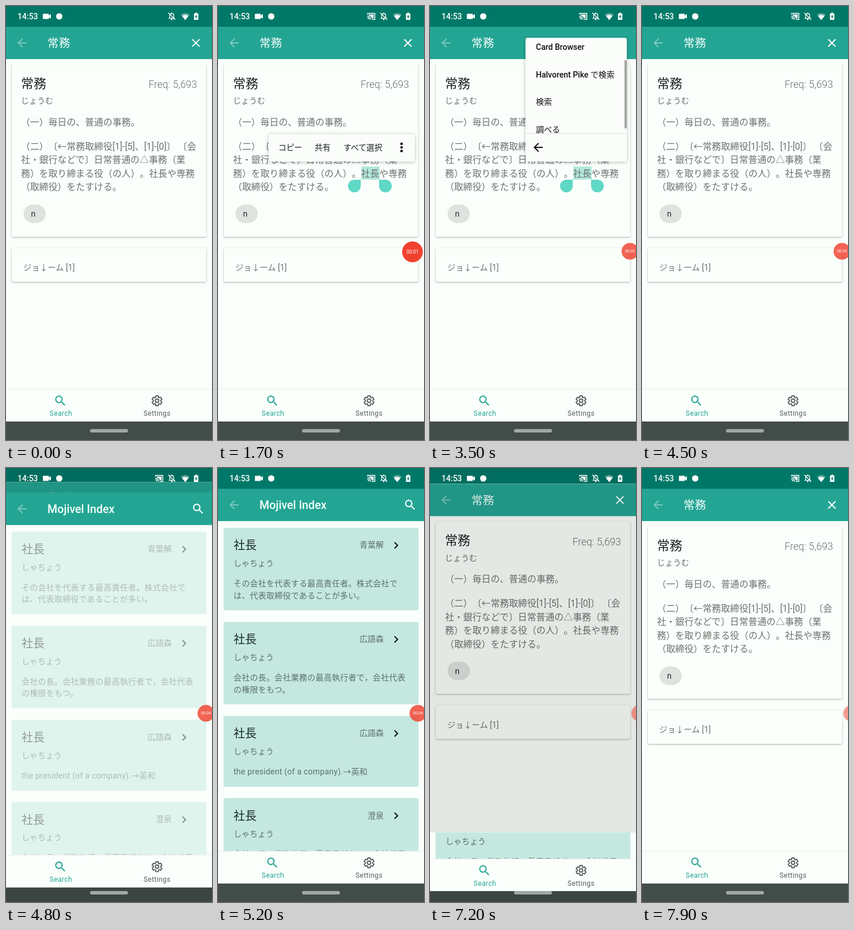
An HTML page for the animation above (8 s loop, 358 px wide and 752 px high).

```html
<!DOCTYPE html>
<html lang="ja">
<head>
<meta charset="utf-8">
<style>
html, body { margin: 0; height: 100%; overflow: hidden; background: #fafffb; }
svg { display: block; overflow: hidden; }
text { font-family: Roboto, "Noto Sans CJK JP", "Noto Sans CJK", sans-serif; text-spacing-trim: space-all; }
.card { fill: #fbfffb; filter: drop-shadow(0 1px 1.5px rgba(0, 0, 0, .32)); }
.popup { fill: #fafdfa; filter: drop-shadow(0 1px 3px rgba(0, 0, 0, .25)); }
</style>
</head>
<body>
<svg id="stage" width="358" height="752" viewBox="0 0 358 752"></svg>
<script>
const TEAL = '#24a594', PAGE = '#fafffb', GREY = '#6c736f', INK = '#1c211f';
const ICONS = {
  back: 'M20 11H7.83l5.59-5.59L12 4l-8 8 8 8 1.41-1.41L7.83 13H20z',
  close: 'M19 6.41L17.59 5 12 10.59 6.41 5 5 6.41 10.59 12 5 17.59 6.41 19 12 13.41 17.59 19 19 17.59 13.41 12z',
  search: 'M15.5 14h-.79l-.28-.27A6.5 6.5 0 1 0 13.73 14.43l.27.28v.79l5 4.99L20.49 19zM9.5 14a4.5 4.5 0 1 1 0-9 4.5 4.5 0 0 1 0 9z',
  chevron: 'M10 6L8.59 7.41 13.17 12l-4.58 4.59L10 18l6-6z'
};

// Text is placed by the vertical centre of its line.
const text = (x, cy, size, str, fill = GREY, attrs = '') =>
  `<text x="${x}" y="${cy + size * .365}" font-size="${size}" fill="${fill}" ${attrs}>${str}</text>`;
const rect = (x, y, w, h, fill, attrs = '') =>
  `<rect x="${x}" y="${y}" width="${w}" height="${h}" fill="${fill}" ${attrs}/>`;
const icon = (name, cx, cy, fill, attrs = '') =>
  `<path d="${ICONS[name]}" transform="translate(${cx - 12} ${cy - 12})" fill="${fill}" ${attrs}/>`;

function gear(cx, cy) {
  const points = [];
  for (let i = 0; i < 6; i++)
    for (const [r, offset] of [[6.6, -21], [8.8, -14], [8.8, 14], [6.6, 21]]) {
      const a = (i * 60 + offset) * Math.PI / 180;
      points.push([cx + r * Math.sin(a), cy - r * Math.cos(a)]);
    }
  return `<g fill="none" stroke="#59605c" stroke-width="1.9" stroke-linejoin="round">
    <polygon points="${points.join(' ')}"/><circle cx="${cx}" cy="${cy}" r="3"/></g>`;
}

const header = (title, action, actionX, weight) => rect(0, 36, 358, 56, TEAL) +
  icon('back', 28, 64, '#fff', 'opacity=".4"') +
  text(72, 64, 19.7, title, '#f4fffb', `font-weight="${weight}"`) +
  icon(action, actionX, 64, '#fff');

const bottomBar = () => rect(0, 664, 358, 56, PAGE) + rect(0, 663.5, 358, 1, '#e9eeea') +
  icon('search', 94.5, 684, TEAL) + gear(262.5, 684) +
  text(95.5, 706, 12, 'Search', TEAL, 'text-anchor="middle" letter-spacing=".4"') +
  text(262.5, 706, 12, 'Settings', '#59605c', 'text-anchor="middle" letter-spacing=".4"');

function entryScreen() {
  const lines = ['（二）〔←常務取締役[1]-[5]、[1]-[0]〕 〔会', '社・銀行などで〕日常普通の△事務（業',
    '務）を取り締まる役（の人）。社長や専務', '（取締役）をたすける。'];
  return rect(0, 0, 358, 36, '#007868') + rect(0, 36, 358, 690, PAGE) +
    header('常務', 'close', 330, 400) +
    '<rect class="card" x="10" y="101" width="338" height="299" rx="3"/>' +
    '<rect class="card" x="10" y="419.5" width="338" height="58.5" rx="3"/>' +
    text(26, 133.5, 22, '常務', INK) + text(26, 164, 14, 'じょうむ') +
    text(332, 136, 17.5, 'Freq: 5,693', GREY, 'text-anchor="end" font-weight="300"') +
    text(26, 201, 15.9, '（一）毎日の、普通の事務。') +
    rect(249, 278, 32, 23, '#b4e8dc', 'id="highlight"') +
    lines.map((line, i) => text(26, 243 + i * 23.5, 15.9, line)).join('') +
    rect(30.5, 344, 38.5, 32, '#dfe3df', 'rx="16"') + text(43.5, 360, 14, 'n', INK) +
    text(30, 453, 14.2, 'ジョ↓ーム [1]') +
    bottomBar() + rect(0, 720, 358, 80, '#424c48');
}

function listScreen() {
  const items = [
    [104, 142, '青葉解', 'その会社を代表する最高責任者。株式会社で', 'は、代表取締役であることが多い。'],
    [267, 142, '広語森', '会社の長。会社業務の最高執行者で，会社代表', 'の権限をもつ。'],
    [430, 122, '広語森', 'the president (of a company).→英和', ''],
    [572.5, 142, '澄泉', '会社の長。業務執行の最高責任者で，会社代表', '']
  ];
  const card = ([y, h, book, ...lines]) =>
    rect(10, y, 338, h, '#c4e8e0', 'rx="2.5" stroke="#b9ddd5" stroke-width=".6"') +
    text(27, y + 30, 20, '社長', '#1b2a26') + text(27, y + 61, 14, 'しゃちょう', '#5c706a') +
    text(288, y + 29, 14, book, '#5c706a', 'text-anchor="end"') +
    icon('chevron', 309.5, y + 30, '#0b1210') +
    lines.map((s, i) => text(27, y + 96 + i * 20.5, 14, s, '#5c706a', 'letter-spacing=".25"')).join('');
  return rect(0, 36, 358, 684, PAGE) +
    `<g id="cards">${items.map(card).join('')}</g>` +
    header('Mojivel Index', 'search', 334, 500) + bottomBar();
}

function popupMenu() {
  const bold = 'font-weight="500"';
  const rows = ['翻訳', 'Card Browser', 'Halvorent Pike で検索', '検索', '調べる'];
  return `<g id="handles" fill="#5fd8c6">
      <path d="M248 301v11a11 11 0 1 1-11-11z"/><path d="M280 301v11a11 11 0 1 0 11-11z"/></g>
    <g id="popup"><rect id="panel" class="popup" rx="4"/>
      <g id="actions">${text(105, 245, 13.8, 'コピー', INK, bold)}${text(168, 245, 13.8, '共有', INK, bold)}
        ${text(218, 245, 13.8, 'すべて選択', INK, bold)}
        ${[238.7, 245, 251.3].map(y => `<circle cx="319" cy="${y}" r="2.2"/>`).join('')}</g>
      <g id="overflow">
        <svg x="166" y="55" width="176" height="166" viewBox="166 55 176 166"><g id="rows">
          ${rows.map((s, i) => text(184, 78.5 + i * 47.5, 14, s, '#111', bold)).join('')}</g>
          <rect id="thumb" x="338" width="4" height="118" fill="#a3a7a4"/></svg>
        ${rect(166, 220.5, 176, 1, '#dde0dd')}${icon('back', 188, 245, '#111')}</g></g>`;
}

const statusIcons = () => `<g fill="#fff">
  ${text(20, 18, 14, '14:53', '#fff', 'font-weight="500"')}
  <path d="M65 13.5h8.500q1 0 1 1v2l3.500-2.500v8l-3.500-2.500v2q0 1-1 1h-8.500q-1 0-1-1v-7q0-1 1-1z"/>
  <circle cx="92.500" cy="18" r="5.500"/>
  <g id="cast"><path fill="none" stroke="#fff" stroke-width="1.400"
    d="M260 15v-2.300h12.500v10.500h-5M259.500 17.500a6 6 0 0 1 6 6M259.500 20.300a3.200 3.200 0 0 1 3.200 3.200"/>
    <path d="M262 14.700h8.500v6.500h-3q-1.500-4-5.500-5z"/></g>
  <path fill="none" stroke="#fff" stroke-width="1.300"
    d="M284.500 21v-4.500q0-3.500 3.500-3.500t3.500 3.500v4.500M282.500 21.300h11M282 11.800l12 12M288 11.500v1.500"/>
  <circle cx="288" cy="23.300" r="1.300"/>
  <path opacity=".4" d="M311.500 24.500l-7.500-9.500q7.500-5.500 15 0z"/><path d="M311.500 24.500l-5.500-7q5.500-3.800 11 0z"/>
  <path d="M329 11.500h3v1.500h2.300v11h-7.600v-11h2.300z"/><path fill="#007868" d="M331 14.500l-2.700 4.700h1.700v3l2.700-4.700H331z"/></g>`;

document.getElementById('stage').innerHTML =
  `<g id="entry">${entryScreen()}${rect(0, 0, 358, 800, '#000', 'id="dim"')}</g>
  <svg id="list" width="358">${listScreen()}</svg>
  ${popupMenu()}${statusIcons()}${rect(146, 733, 66, 6, '#a0a8a4', 'rx="3"')}
  <g id="bubble"><circle r="18" fill="#f0412f"/>
    <text id="timer" y="3" font-size="8.5" fill="#fff" text-anchor="middle"></text></g>`;

const el = {};
document.querySelectorAll('[id]').forEach(e => el[e.id] = e);
const set = (id, attrs) => { for (const k in attrs) el[id].setAttribute(k, attrs[k]); };

const mix = (a, b, p) => a + (b - a) * p;
const ramp = (t, from, to) => Math.min(1, Math.max(0, (t - from) / (to - from)));

// cubic-bezier(.4, 0, .2, 1), solved by bisection
function ease(x) {
  let lo = 0, hi = 1;
  for (let i = 0; i < 20; i++) {
    const s = (lo + hi) / 2, q = 1 - s;
    if (1.2 * q * q * s + .6 * q * s * s + s * s * s < x) lo = s; else hi = s;
  }
  return lo * lo * (3 - 2 * lo);
}

function drawTransition(t) {
  const open = ramp(t, 4587, 5012), close = ramp(t, 7064, 7489);
  const closing = close > 0, u = closing ? close : open;
  const shown = closing ? 1 - ease(u) : ease(u);
  const revealed = closing ? (1 - u) ** 5 : 1 - (1 - u) ** 5;
  const moving = u > 0 && u < 1;
  const hidden = Math.max(36, 752 * .959 * (1 - revealed));
  const height = Math.max(0, 720 - hidden);

  set('entry', { transform: `translate(0 ${moving ? -15 * shown : 0})` });
  set('dim', { opacity: !moving ? 0 : .1 * (closing ? 1 - u * u : Math.min(1, 2 * u)) });
  set('list', {
    y: hidden + 31 * (1 - shown), height, viewBox: `0 ${hidden} 358 ${height}`,
    visibility: open > 0 && close < 1 ? 'visible' : 'hidden'
  });
  set('cards', { opacity: ramp(t, 4570, 5060) });
}

function drawPopup(t) {
  const gone = 1 - ramp(t, 4100, 4250);
  const grow = ease(ramp(t, 2450, 2700));
  const scroll = 55 * ease(ramp(t, 2780, 3100));
  const x = mix(88, 166, grow), y = mix(222, 55, grow);
  set('highlight', { opacity: ramp(t, 1050, 1150) * gone });
  set('handles', { opacity: ramp(t, 1450, 1600) * gone });
  set('popup', { opacity: ramp(t, 1450, 1650) * gone });
  set('panel', { x, y, width: 342 - x, height: 269.5 - y });
  set('actions', { opacity: 1 - ramp(t, 2430, 2530) });
  set('overflow', { opacity: ramp(t, 2600, 2750) });
  set('rows', { transform: `translate(0 ${-scroll})` });
  set('thumb', { y: 55 + scroll * .71 });
}

function drawBubble(t) {
  const dock = ease(ramp(t, 2600, 2900)), hide = ease(ramp(t, 5400, 5800));
  const x = mix(mix(338, 347.5, dock), 364.5, hide);
  set('bubble', {
    transform: `translate(${x} ${426 - dock}) scale(${mix(1, .81, dock)})`,
    opacity: ramp(t, 300, 700) * mix(mix(1, .82, dock), .52, hide)
  });
  el.timer.textContent = '00:0' + Math.max(0, Math.floor((t - 500) / 1030));
  set('timer', { opacity: 1 - hide });
  set('cast', { opacity: ramp(t, 100, 250) });
}

function frame(now) {
  const t = now % 8000;
  drawTransition(t);
  drawPopup(t);
  drawBubble(t);
  requestAnimationFrame(frame);
}
frame(0);
</script>
</body>
</html>
```
